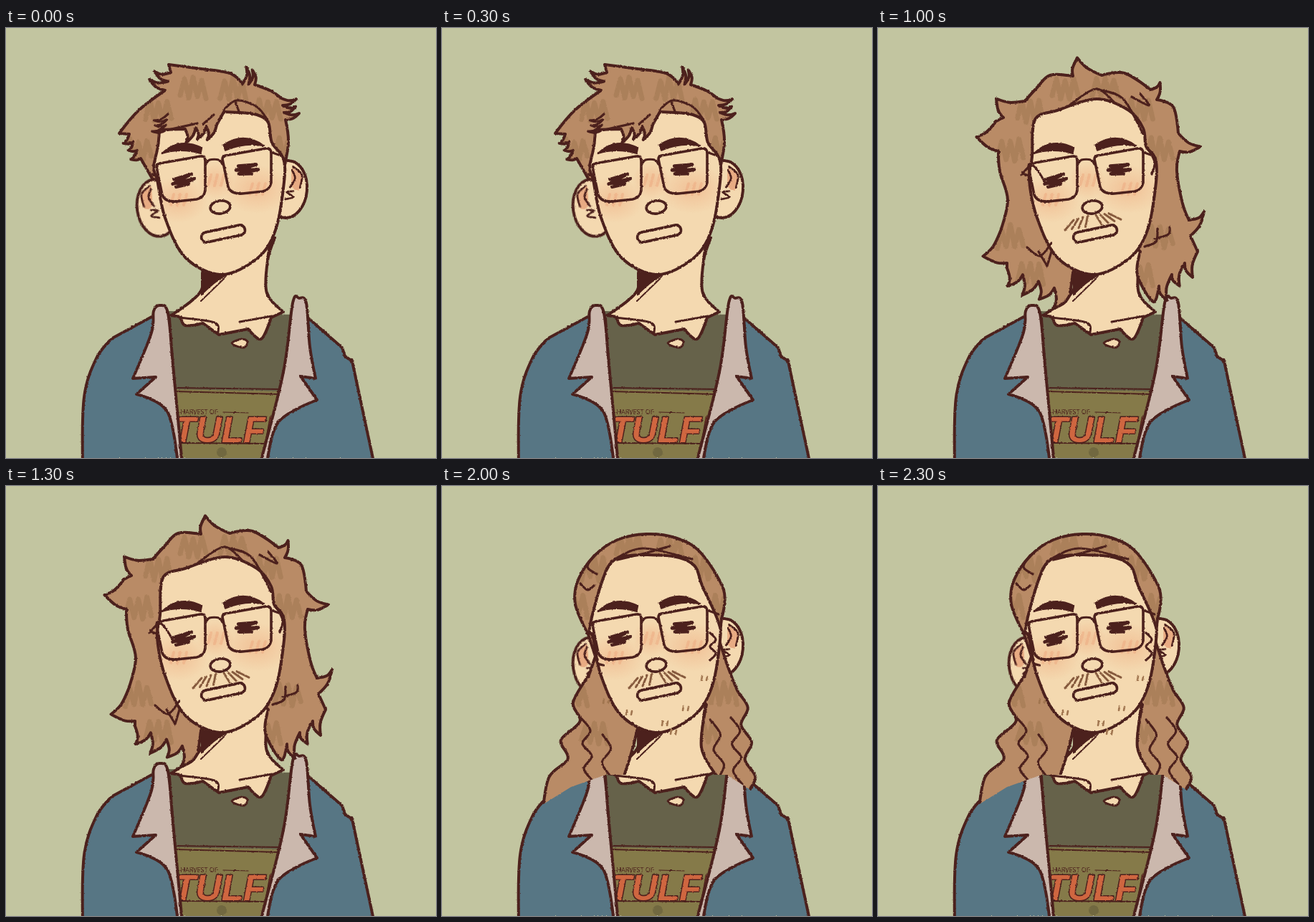
Animation of 600 by 600 pixels, one loop 2.5 s. Source, as an HTML page:

```html
<!DOCTYPE html>
<html lang="en">
<head>
<meta charset="utf-8">
<title>Hair over the years</title>
<style>
html, body { margin: 0; width: 100%; height: 100%; overflow: hidden; background: #c2c5a0; }
svg { display: block; width: 100vw; height: 100vh; }
</style>
</head>
<body>
<svg id="stage" viewBox="0 0 600 600"></svg>
<script>
const INK = '#4c211d', SKIN = '#f4d9b0', HAIR = '#b98b66', SHADE = '#8d6840';
const JACKET = '#577684', LAPEL = '#cbb8ad', SHIRT = '#66624a', PANEL = '#857a49';
const range = n => [...Array(n).keys()];

// Smooth curve through "x,y" points; "!" marks a sharp corner.
function curve(text, closed) {
  const pts = [...text.matchAll(/(-?[\d.]+),(-?[\d.]+)(!?)/g)].map(m => ({ x: +m[1], y: +m[2], sharp: m[3] }));
  const n = pts.length;
  const at = i => closed ? pts[(i + n) % n] : pts[Math.max(0, Math.min(n - 1, i))];
  const handle = (i, sign) => {
    const p = at(i), a = at(i - 1), b = at(i + 1), k = p.sharp ? 0 : sign / 6;
    return `${(p.x + (b.x - a.x) * k).toFixed(1)} ${(p.y + (b.y - a.y) * k).toFixed(1)}`;
  };
  let d = `M${pts[0].x} ${pts[0].y}`;
  for (let i = 0; i < (closed ? n : n - 1); i++)
    d += `C${handle(i, 1)} ${handle(i + 1, -1)} ${at(i + 1).x} ${at(i + 1).y}`;
  return closed ? d + 'Z' : d;
}
const path = (d, fill, stroke, width, extra = '') =>
  `<path d="${d}" fill="${fill}" stroke="${stroke}" stroke-width="${width}" ${extra}/>`;
const shape = (text, fill, width = 4) => path(curve(text, true), fill, width ? INK : 'none', width);
const line = (text, width = 3.2, color = INK) =>
  text.split('|').map(t => path(curve(t), 'none', color, width)).join('');
const place = (x, y, turn, content, flip = 1) =>
  `<g transform="translate(${x} ${y}) rotate(${turn}) scale(${flip} 1)">${content}</g>`;
const point = (x, y, mark = '') => `${x.toFixed(1)},${y.toFixed(1)}${mark} `;

// n curling tufts along a base line, each tip pushed out by (dx, dy).
function tufts(x0, y0, x1, y1, n, dx, dy) {
  const curl = .14 * Math.sign(dx);
  const base = t => [x0 + (x1 - x0) * t, y0 + (y1 - y0) * t];
  return range(n).map(i => {
    const size = i % 2 ? .85 : 1, a = base(i / n), b = base((i + 1) / n), m = base((i + .5) / n);
    const tip = [m[0] + dx * size, m[1] + dy * size];
    const bend = p => point((p[0] + tip[0]) / 2 - dy * curl, (p[1] + tip[1]) / 2 + dx * curl);
    return point(...a, '!') + bend(a) + point(...tip, '!') + bend(b) + point(...b, '!');
  }).join('');
}
// Strand that swings from side to side.
const wave = (x0, y0, x1, y1, swing, steps) => range(steps + 1).map(k =>
  point(x0 + (x1 - x0) * k / steps + (k % 2 ? swing : -swing), y0 + (y1 - y0) * k / steps)).join('');

// Hatched patches spread in an arch over the head and down both sides.
function shading(seed) {
  const random = () => (seed = seed * 16807 % 2147483647) / 2147483647;
  return range(10).map(i => {
    const a = Math.PI * (.75 + 1.5 * i / 9);
    const x = 293 + 108 * Math.cos(a), y = 200 + 120 * Math.sin(a) + (Math.sin(a) > 0 ? 60 : 0);
    const d = range(7).map(k => `${k ? 'L' : 'M'}${x - 22 + k * 6} ${y + (k % 2 ? -1 : 1) * (9 + 8 * random())}`).join('');
    return path(d, 'none', SHADE, 7, 'opacity=".3"');
  }).join('');
}

const body =
  shape('226,395! 402,400! 400,600! 226,600!', SHIRT, 0) +
  shape('232,504! 384,507! 370,600! 236,600!', PANEL, 0) +
  line('234,502 382,504|234,507 382,511|234,579 372,580', 1.8) +
  `<text x="236" y="539" font-size="9" fill="${INK}" font-family="'Open Sans', sans-serif">E HARVEST OF</text>` +
  line('303,536 338,537', 1.2) +
  `<text x="234" y="578" font-size="50" font-weight="bold" font-style="italic" fill="#cf6640" stroke="${INK}" stroke-width="3" paint-order="stroke" font-family="'Liberation Sans', sans-serif">TULFI</text>` +
  '<circle cx="301" cy="592" r="7" fill="#716840"/>';

const neck =
  shape('272,325! 272,367 230,401! 244,403! 250,415 275,412! 297,428! 338,420! 356,434 370,404! 387,396! 364,370 365,325 375,293!', SKIN) +
  line('242,404 291,411 296,426|326,410 371,402', 3) +
  shape('315,440 329,434 337,438 331,446', SKIN, 3) +
  shape('272,340! 314,342! 292,356 272,374!', INK, 0) +
  line('307,347 272,381', 2) +
  shape('376,292! 364,322! 367,304!', INK, 2);

const jacket =
  shape('207,401! 148,433! 126,461 109,515 107,610! 242,610! 236,545 228,405!', JACKET) +
  shape('215,387 206,395 203,425 177,489! 209,487! 182,511! 225,535 240,610! 246,610! 233,470 226,398', LAPEL) +
  shape('422,405! 469,446! 473,458! 483,465! 486,479 514,610! 360,610! 392,480 400,405!', JACKET) +
  shape('409,377 400,384 387,480 354,610! 364,610! 380,550 434,519! 411,486! 432,489! 424,445 419,384', LAPEL);

const ear = (x, y, turn, flip) => place(x, y, turn,
  `<ellipse rx="28" ry="40" fill="${SKIN}" stroke="${INK}" stroke-width="4"/>` +
  shape('-4,-31! -20,-20 -18,-2 -7,-4', '#e8ab83', 0) +
  line('-6,-32 -19,-22 -18,-4|-5,-27 -10,-16 -4,-3|-9,2 0,4 -10,10 1,14', 2.8), flip);
const ears = ear(211, 251, -8, 1) + ear(392, 225, 5, -1);

const JAW = ' 211,212 222,265 250,320 300,344 350,322 376,282 388,215';
const blush = (x, y, rx, ry) => `<ellipse cx="${x}" cy="${y}" rx="${rx}" ry="${ry}" fill="url(#blush)"/>` +
  range(3).map(i => line(`${x - 10 + i * 9},${y + 7} ${x - 6 + i * 9},${y - 8}`, 4, '#eba57c70')).join('');
const cheeks = blush(240, 240, 42, 32) + blush(350, 225, 48, 34) + blush(292, 213, 26, 26);

const eye = (x, y, turn) => place(x, y, turn, path('M-12 -4L13 -7L-15 2L16 0L-11 7L7 6', 'none', INK, 4.6));
const brow = (x, y, turn, flip) => place(x, y, turn, path('M0 -3Q33 -16 55 9Q30 -1 1 5Z', INK, INK, 2), flip);
const lens = (x, y) => place(x, y, 0,
  path('M0 4Q0 0 4 -1L61 -11Q68 -12 68 -4V37Q66 47 56 49L28 52Q12 53 8 43Z', 'none', INK, 3.6));
const features =
  brow(273, 170, 4, -1) + brow(304, 166, -11, 1) + eye(247, 213, -10) + eye(336, 197, 2) +
  place(299, 250, -8, `<ellipse rx="14" ry="9" fill="${SKIN}" stroke="${INK}" stroke-width="3.6"/>`) +
  place(303, 287, -12, `<rect x="-31" y="-7" width="62" height="14" rx="7" fill="${SKIN}" stroke="${INK}" stroke-width="3.8"/>`) +
  lens(210, 190) + lens(302, 179) + line('279,190 284,184 297,184 302,190|372,174 386,179|211,206 204,204');

const mustache = range(4).map(i =>
  `${273 + 6.5 * i},${268 - 2 * i} ${261 + 9.5 * i},${282 - 1.5 * i}|${304 + 6 * i},${261 - .7 * i} ${312 + 9 * i},${274 - 2.3 * i}`).join('|');
const stubble = [[229, 300], [261, 316], [311, 331], [340, 310], [366, 268], [323, 343]].map(([x, y]) =>
  `${x - 3},${y - 3} ${x - 4},${y + 3}|${x + 4},${y - 2} ${x + 3},${y + 3}`).join('|');

const looks = [
  {
    ears: true,
    hair: '158,147! 185,115 ' + tufts(222, 87, 230, 62, 2, -24, -9) + '227,51! 265,56 312,63 ' +
      tufts(330, 78, 347, 79, 2, 1, -24) + '370,88 ' + tufts(384, 98, 390, 128, 3, 20, -4) +
      '394,160 387,200! 300,250! 204,210! ' + tufts(188, 182, 172, 148, 3, -11, 7),
    brow: '387,182 371,160 366,132 350,121 326,118! 304,117! ' + tufts(294, 135, 250, 141, 3, -6, 20) +
      '214,142! 212,165 206,195',
    lines: tufts(226, 120, 222, 143, 3, -19, 5) + '267,133|290,121 275,134|304,114 322,101 350,110 366,130|326,119 320,103'
  },
  {
    ears: true, fuzz: '#6d564499',
    hair: tufts(203, 208, 178, 208, 1, -30, 24) + tufts(170, 205, 160, 160, 2, -26, -12) + '170,132 ' +
      tufts(186, 116, 208, 98, 1, -38, -8) + '238,70 272,54 304,62 ' + tufts(328, 75, 344, 80, 1, -13, -40) +
      tufts(344, 80, 368, 88, 1, 22, -24) + '388,98 404,120 ' + tufts(413, 137, 413, 160, 1, 29, -10) +
      tufts(413, 160, 410, 180, 1, 15, 17) + tufts(408, 180, 394, 188, 1, 10, 29) + '386,210! 372,290! ' +
      tufts(380, 310, 390, 327, 1, 33, -20) + tufts(390, 327, 380, 350, 1, 12, 12) + tufts(380, 350, 362, 350, 1, -3, 14) +
      '368,305! 300,250! 272,342! ' + tufts(273, 345, 258, 362, 1, -12, 27) + tufts(258, 362, 248, 350, 1, -17, 12) +
      tufts(246, 352, 244, 328, 1, -25, 5) + '250,317! 216,240!',
    brow: '387,182 372,165 361,118 291,96! 223,126 214,145 215,180',
    lines: '272,102 290,92 358,118 364,145|211,192 220,222 242,237 218,227|366,165 381,183 380,205|204,170 193,195 196,214'
  },
  {
    fuzz: '#865a3d',
    hair: '222,83 240,66 ' + tufts(272, 67, 312, 66, 1, -14, -25) + '344,63 ' + tufts(380, 86, 389, 100, 1, 9, -17) +
      '412,110 ' + tufts(419, 147, 421, 172, 1, 30, 6) + '417,200 425,245 ' + tufts(434, 268, 436, 290, 1, 20, -23) +
      tufts(446, 312, 392, 360, 3, 2, 28) + '384,382 362,345 366,312! 300,250! 272,342! ' +
      tufts(268, 372, 180, 335, 4, -12, 24) + tufts(180, 328, 171, 283, 1, -29, 13) + '181,240 170,200 ' +
      tufts(168, 172, 165, 130, 1, -29, 1) + tufts(175, 125, 205, 102, 1, -25, -15),
    brow: '387,182 374,165 370,140 350,115 305,99 250,115 219,128 215,180',
    lines: '268,107 304,85 329,103|308,86 342,99 370,148|200,205 216,192 233,215|208,306 226,318 242,300|224,312 236,332! 242,312|372,305 388,298 390,280|386,294 405,288 407,278|376,167 386,187 382,204|354,96 378,108 366,92'
  },
  {
    cut: true, fuzz: '#865a3d', stubble: true,
    hair: '285,45 328,60 347,78 380,88 417,138 421,230 ' + wave(425, 270, 434, 415, 5, 4) + '436,470! 380,470! ' +
      wave(378, 420, 364, 350, 6, 2) + '366,312! 300,250! 272,342! ' + wave(271, 355, 262, 400, 8, 2) +
      '228,450! 135,470! ' + wave(150, 440, 150, 268, 9, 4) + '154,212 152,162 200,95 260,57',
    brow: '387,195 379,180 363,140 355,112 308,95 281,94! 255,108! 225,147 214,190',
    lines: ['255,107 308,73 322,99', '277,92 302,97 302,89', wave(202, 255, 206, 415, 8, 4), wave(224, 270, 230, 410, 8, 4),
      wave(250, 345, 260, 395, 7, 2), wave(169, 356, 168, 435, 7, 2), wave(390, 263, 385, 405, 8, 4),
      '376,152 378,169 392,180 385,198', '140,270 125,297 141,322', '136,325 117,350 130,375'].join('|')
  },
  {
    ears: true, cut: true, fuzz: '#865a3d', stubble: true,
    hair: '285,67 325,72 360,92 393,145 390,185! 387,216! 400,255 ' + wave(418, 285, 434, 430, 6, 6) +
      '430,470! 384,405! 362,365 369,305! 300,250! 272,342! 262,380 235,460! 140,460! ' +
      wave(158, 407, 192, 302, 9, 4) + '205,264! 214,238! 204,207! 186,165 190,131 213,97 245,75',
    brow: '385,188 363,139 352,111 322,98 263,97 237,106 222,137 206,198',
    lines: ['236,105 280,87 349,102', '245,103 290,92 318,84', '212,97 203,113 216,123', '193,136 203,145 212,139',
      wave(200, 324, 205, 412, 6, 5), wave(230, 347, 229, 405, 6, 3), wave(380, 326, 390, 410, 6, 4),
      wave(409, 323, 413, 416, 6, 5), wave(378, 205, 378, 243, 4, 4), '215,235 217,247 225,250'].join('|')
  }
];

function portrait(look, i) {
  const outline = curve(look.hair, true), face = look.brow + JAW;
  const trim = content => `<g ${look.cut ? 'clip-path="url(#collar)"' : ''}>${content}</g>`;
  return `<clipPath id="hair${i}"><path d="${outline}"/></clipPath>
    <clipPath id="face${i}"><path d="${curve(face, true)}"/></clipPath>
    <g class="look" filter="url(#pencil)" visibility="hidden">
    ${body + neck + jacket + (look.ears ? ears : '')}
    ${trim(path(outline, HAIR, 'none', 0) + `<g clip-path="url(#hair${i})">${shading(i * 77 + 5)}</g>` + path(outline, 'none', INK, 4))}
    ${path(curve(face, true), SKIN, 'none', 0)}<g clip-path="url(#face${i})">${cheeks}</g>
    ${path(curve(face, true), 'none', INK, 4)}
    ${trim(line(look.lines))}
    ${look.fuzz ? line(mustache, 3, look.fuzz) : ''}
    ${look.stubble ? line(stubble, 2.6, '#a17650') : ''}
    ${features}</g>`;
}

const stage = document.getElementById('stage');
stage.innerHTML = `<defs>
  <filter id="pencil" filterUnits="userSpaceOnUse" x="0" y="0" width="600" height="600" color-interpolation-filters="sRGB">
    <feTurbulence type="fractalNoise" baseFrequency=".35" numOctaves="2" seed="4" result="grain"/>
    <feDisplacementMap in="SourceGraphic" in2="grain" scale="2.5" xChannelSelector="R" yChannelSelector="G"/>
  </filter>
  <radialGradient id="blush"><stop offset=".2" stop-color="#efb287" stop-opacity=".5"/><stop offset="1" stop-color="#efb287" stop-opacity="0"/></radialGradient>
  <clipPath id="collar"><path d="M0 0H600V520L440 430 397 403H228L180 420 143 443 0 520Z"/></clipPath>
  </defs><rect width="600" height="600" fill="#c2c5a0"/>
  <g stroke-linecap="round" stroke-linejoin="round">${looks.map(portrait).join('')}</g>`;

const groups = [...stage.querySelectorAll('.look')];
function draw() {
  const current = Math.floor(performance.now() % 2500 / 500);
  groups.forEach((g, i) => g.setAttribute('visibility', i === current ? 'visible' : 'hidden'));
  requestAnimationFrame(draw);
}
draw();
</script>
</body>
</html>
```
